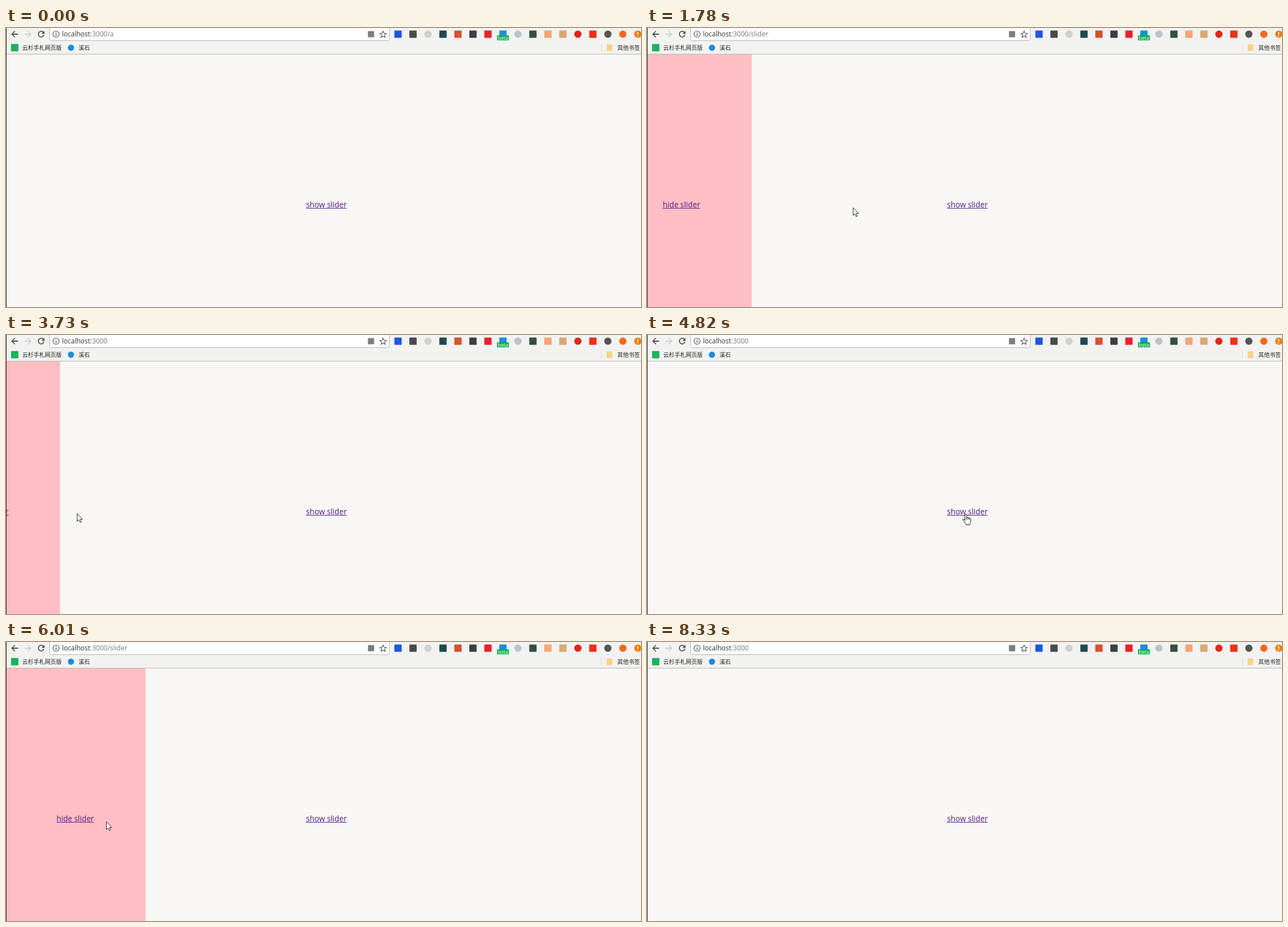
Recreate the animation shown at these times as an HTML page. Size 1129 by 496 pixels, loop 8.58 s.

```html
<!DOCTYPE html>
<html lang="zh">
<head>
<meta charset="utf-8">
<title>Slider</title>
<style>
  html, body { margin: 0; width: 100%; height: 100%; overflow: hidden; background: #f8f7f6; }
  #stage { position: absolute; left: 0; top: 0; width: 1129px; height: 496px; overflow: hidden; background: #f8f7f6; }
  svg { position: absolute; left: 0; top: 0; overflow: visible; }
  svg text { font-family: "Open Sans", "Noto Sans", sans-serif; white-space: pre; }
  svg .cjk { font: 10px "Noto Sans CJK SC", "Noto Sans CJK", sans-serif; fill: #222; }
  .link {
    position: absolute; top: 304px; white-space: nowrap; color: #551a8b;
    font: 13.7px/20px "Open Sans", "Noto Sans", sans-serif;
    text-decoration: underline 1px; text-underline-offset: 1px;
  }
  .link.pressed { color: #f00; }
  #show { left: 533.5px; }
  #panel { position: absolute; left: 1px; top: 0; width: 250px; height: 496px; clip-path: inset(47px 0 0 0); background: #ffbec4; }
  #hide { left: 0; width: 250px; text-align: center; }
  #edge { position: absolute; left: 0; top: 0; width: 1px; height: 496px; background: #222; }
</style>
</head>
<body>
<div id="stage">
  <div id="show" class="link">show slider</div>
  <div id="panel"><div id="hide" class="link">hide slider</div></div>

  <svg width="1129" height="47">
    <rect width="1129" height="47" fill="#f2f2f1"/>
    <rect y="46" width="1129" height="1" fill="#b8b6b6"/>

    <g fill="none" stroke="#505050" stroke-width="1.8">
      <path d="M21.5 11H11M15.8 5.5L10.5 11l5.3 5.5"/>
      <path d="M33 11H44M38.7 5.5L44 11l-5.3 5.5" stroke="#cfcfcf"/>
      <path d="M66.5 7.8A5 5 0 1 0 67.3 12.3"/>
    </g>
    <path d="M68.5 5v5.500h-5.500z" fill="#505050"/>

    <rect x="77.5" y="-6.5" width="604" height="29" rx="3" fill="#fff" stroke="#b4b4b4"/>
    <circle cx="89" cy="11" r="5.5" fill="none" stroke="#555" stroke-width="1.2"/>
    <path d="M89 10v4M89 7.5v1.5" stroke="#555" stroke-width="1.4"/>
    <text x="99.5" y="15" font-size="12" fill="#333">localhost<tspan id="path" fill="#7b7b7b"></tspan></text>
    <rect x="643.5" y="5.5" width="11" height="11" fill="#7d7d7d"/>
    <path d="M670.5 5.5l1.7 3.8 4.1.4-3.1 2.7.9 4.1-3.6-2.1-3.6 2.1.9-4.1-3.1-2.7 4.1-.4z"
          fill="none" stroke="#555" stroke-width="1.2"/>

    <g id="icons"></g>
    <rect x="873" y="13" width="21" height="9" fill="#0cb14c"/>
    <text x="883.5" y="20.8" font-size="9" fill="#fff" text-anchor="middle">beta</text>
    <path d="M1123 7v5M1123 13.5v1.8" stroke="#fff" stroke-width="1.8"/>

    <rect x="9" y="28.500" width="13" height="13" fill="#1bb35d"/>
    <text class="cjk" x="29" y="39">云杉手札网页版</text>
    <circle cx="115.5" cy="35" r="5.5" fill="#1a8ce0"/>
    <text class="cjk" x="129" y="39">溪石</text>
    <rect x="1058" y="28" width="1" height="14" fill="#d6d6d6"/>
    <path d="M1068 29h9v2h1v10h-10z" fill="#f8d286"/>
    <text class="cjk" x="1087" y="39">其他书签</text>
  </svg>

  <div id="edge"></div>

  <svg width="1129" height="496">
    <g id="cursor" fill="#fff" stroke="#111" stroke-linejoin="round">
      <path id="arrow" d="M.5.5V14.3L3.7 11.4 5.8 16.3 8 15.4 5.9 10.6H10z" stroke-width=".9"/>
      <g id="hand">
        <path d="M-1.5 12V1.9a1.5 1.5 0 0 1 3 0V7c0-1.1 2.6-1.1 2.6.6 0-1.1 2.4-1 2.4.7.2-1 2.2-.6 2.2 1V13c0 3-1.7 3.5-1.9 6.5H.5C0 16.5-3.5 13.5-5.3 10.8c-.8-1.7 1.4-2.4 2.3-1.3z"/>
        <path d="M1.5 6.5V10M4.1 7.5V10M6.5 8.3V10.5" fill="none"/>
      </g>
    </g>
  </svg>
</div>

<script>
const $ = id => document.getElementById(id);
const LOOP = 8580, REFRESH = 78.5, PITCH = 26.65, WIDTH = 250;

// Evenly spaced toolbar marks; "o" makes a circle
const marks = "#1c58e0 #4a4a4a o#d0d0d0 #1d4b4d #d4542e #3a3f45 #e6232c #188fd8 o#b9c4ca " +
  "#34503f #f3a673 #d9a874 o#e02618 #ee3018 o#555 o#f2691b o#f57c05";
$("icons").innerHTML = marks.split(" ").map((mark, i) => {
  const round = mark[0] === "o";
  return `<rect x="${690.5 + PITCH * i}" y="4.5" width="13" height="13"
    rx="${round ? 6.5 : 1}" fill="${mark.slice(round)}"/>`;
}).join("");

// Clicks alternate between show and hide; hold is how long the press lasts
const clicks = [
  { at: 1380, hold: 150 }, { at: 3400, hold: 0 },
  { at: 5050, hold: 0 }, { at: 6710, hold: 150 }
];

// Pointer moves: each starts where the last one ended
const entry = { start: 70, end: 70, x: 704, y: 420 };
const moves = [
  { start: 70, end: 680, x: 593, y: 314 },
  { start: 750, end: 990, x: 588, y: 313 },
  { start: 1460, end: 2555, x: 135, y: 326 },
  { start: 2555, end: 3090, x: 126, y: 317 },
  { start: 4200, end: 4820, x: 567, y: 318 },
  { start: 5130, end: 6000, x: 178, y: 319 },
  { start: 6010, end: 6560, x: 129, y: 316 },
  { start: 7110, end: 7480, x: 920, y: 500 }
];

const easeOut = u => u * (2 - u);

function pointerAt(t) {
  let { x, y } = entry;
  for (const m of moves) {
    const u = easeOut(Math.min(1, Math.max(0, (t - m.start) / (m.end - m.start))));
    x += (m.x - x) * u;
    y += (m.y - y) * u;
  }
  return { x: Math.round(x), y: Math.round(y) };
}

// Critically damped spring: share of the way still to go
function remaining(age) {
  const s = Math.max(0, age - 15) * 0.007;
  return (1 + s) * Math.exp(-s);
}

const hits = (p, left, right) => p.x >= left && p.x <= right && p.y >= 304 && p.y <= 323;

function draw(now) {
  const t = now % LOOP;
  const done = clicks.filter(c => c.at <= t).length;
  const open = done % 2 === 1;

  // The screen refreshes in steps counted from the last click
  const origin = done ? clicks[done - 1].at : entry.start;
  const step = origin + Math.floor((t - origin) / REFRESH) * REFRESH;

  const left = done ? remaining(step - origin) : 1;
  const shift = -WIDTH * (open || !done ? left : 1 - left);
  $("panel").style.transform = `translateX(${shift.toFixed(2)}px)`;
  $("path").textContent = ":3000" + (open ? "/slider" : done ? "" : "/a");

  ["show", "hide"].forEach((id, side) => {
    const pressed = clicks.some((c, i) =>
      i % 2 === side && t >= c.at - c.hold && t < c.at + REFRESH);
    $(id).classList.toggle("pressed", pressed);
  });

  const p = pointerAt(step);
  const over = hits(p, 533, 606) || hits(p, 92 + shift, 159 + shift);
  $("cursor").style.display = t < entry.start ? "none" : "";
  $("cursor").setAttribute("transform", `translate(${p.x} ${p.y})`);
  $("arrow").style.display = over ? "none" : "";
  $("hand").style.display = over ? "" : "none";
  requestAnimationFrame(draw);
}
draw(0);
</script>
</body>
</html>
```
